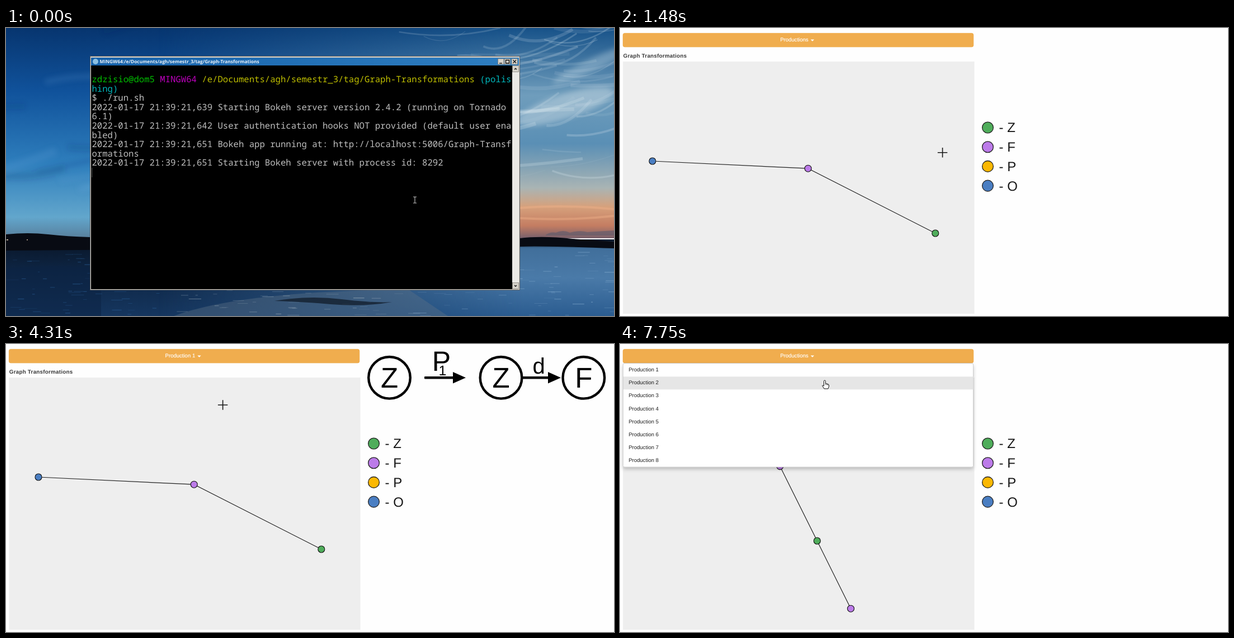
Recreate the animation shown at these times as an HTML page. Size 1087 by 515 pixels, loop 8 s.

```html
<!DOCTYPE html>
<html lang="en">
<head>
<meta charset="utf-8">
<title>Graph Transformations</title>
<style>
html, body { margin: 0; width: 100%; height: 100%; overflow: hidden; background: #fefefe; }
svg { display: block; text-rendering: geometricPrecision; }
text { white-space: pre; font-family: "Liberation Sans", Arial, sans-serif; }
.term text { font: 15.63px "Noto Sans Mono", "DejaVu Sans Mono", monospace; fill: #bfbfbf; }
.ui { font-size: 9.55px; }
</style>
</head>
<body>
<svg id="stage" width="1087" height="515" viewBox="0 0 1087 515" xmlns="http://www.w3.org/2000/svg"></svg>
<script>
const LOOP = 8000;
const COLORS = { Z: '#4fad5b', F: '#bc7be9', P: '#fbb803', O: '#4a7ec2' };

const rect = (x, y, w, h, fill, more = '') =>
  `<rect x="${x}" y="${y}" width="${w}" height="${h}" fill="${fill}" ${more}/>`;
const text = (x, y, s, more = '') => `<text x="${x}" y="${y}" ${more}>${s}</text>`;
const path = (d, more) => `<path d="${d}" ${more}/>`;
const group = (id, body, more = '') => `<g id="${id}" ${more}>${body}</g>`;

let seed = 11;
const rnd = (a, b) => {
  seed = (seed * 16807) % 2147483647;
  return a + (b - a) * seed / 2147483647;
};
const many = (n, make) => Array.from({ length: n }, (_, i) => make(i)).join('');

function gradient(id, stops, dir = 'x2="0" y2="1"') {
  return `<linearGradient id="${id}" x1="0" y1="0" ${dir}>` +
    stops.map(([at, c, o = 1]) => `<stop offset="${at}" stop-color="${c}" stop-opacity="${o}"/>`).join('') +
    '</linearGradient>';
}

function defs() {
  return '<defs>' +
    gradient('skyL', [[0, '#07356f'], [.3, '#10529b'], [.65, '#2f7fbd'], [.9, '#62a6cc'], [1, '#587f9c']]) +
    gradient('skyR', [[0, '#175289'], [.32, '#6f9dbc'], [.55, '#5a8fb5'], [.76, '#a9b4b4'],
      [.85, '#d6a17c'], [.94, '#c47d62'], [1, '#77606c']]) +
    gradient('waterL', [[0, '#091526'], [.35, '#0d2340'], [1, '#15365f']]) +
    gradient('waterR', [[0, '#0c1727'], [.12, '#416f9b'], [.5, '#4a7aa8'], [1, '#2b5c90']]) +
    gradient('side', [[.25, '#fff', 0], [.85, '#fff', 1]], 'x2="1" y2="0"') +
    gradient('title', [[0, '#1662ab'], [1, '#2f7ec0']], 'x2="1" y2="0"') +
    `<mask id="right">${rect(0, 0, 1087, 515, 'url(#side)')}</mask>` +
    '<filter id="soft"><feGaussianBlur stdDeviation="5"/></filter>' +
    '<filter id="shade" x="-5%" y="-10%" width="110%" height="125%">' +
    '<feDropShadow dx="0" dy="3.5" stdDeviation="3" flood-opacity=".22"/></filter></defs>';
}

function wallpaper() {
  const streak = () => {
    const x = rnd(700, 1050), y = rnd(-20, 260), w = rnd(60, 190);
    return path(`M${x} ${y}q${w / 2} ${rnd(-5, 25)} ${w} ${rnd(-50, 10)}`,
      `fill="none" stroke="#dfeaf0" stroke-width="${rnd(1, 7)}" opacity="${rnd(.06, .24)}"`);
  };
  const wisp = () => {
    const x = rnd(-60, 480), y = rnd(5, 330);
    return path(`M${x} ${y}q60 ${rnd(-22, 8)} ${rnd(90, 170)} ${rnd(-40, -5)}`,
      `fill="none" stroke="${rnd(0, 1) < .5 ? '#052b5e' : '#6fb0dc'}" stroke-width="${rnd(3, 15)}" opacity=".16"`);
  };
  const ripple = () => {
    const x = rnd(0, 1087), y = rnd(400, 515), mid = x > 300 && x < 720;
    const c = mid ? '#9aacb9' : x > 720 ? '#86add0' : '#2b619a';
    return path(`M${x} ${y}h${rnd(3, 24)}`, `stroke="${c}" stroke-width="${rnd(.5, 1.5)}" opacity="${rnd(.2, .55)}"`);
  };
  return rect(0, 0, 1087, 376, 'url(#skyL)') +
    `<g mask="url(#right)">${rect(0, 0, 1087, 376, 'url(#skyR)')}</g>` +
    `<g filter="url(#soft)">${many(28, wisp)}` +
    '<ellipse cx="1000" cy="140" rx="90" ry="22" fill="#dce7ea" opacity=".4" transform="rotate(-18 1000 140)"/>' +
    '<ellipse cx="1050" cy="65" rx="80" ry="11" fill="#b7d0df" opacity=".4" transform="rotate(-25 1050 65)"/></g>' +
    many(55, streak) +
    path('M918 322q80 -7 169 2M918 340q90 5 169 -4', 'fill="none" stroke="#efb28b" stroke-width="4" opacity=".4"') +
    path('M965 370q8 -6 18 -4q13 -6 25 0q18 -5 31 -1l48 -3v9h-122z', 'fill="#665d6c" opacity=".7"') +
    rect(0, 378, 1087, 137, 'url(#waterL)') +
    `<g mask="url(#right)">${rect(0, 378, 1087, 137, 'url(#waterR)')}</g>` +
    path('M0 369q40 -4 75 0t75 5L918 376q40 -5 95 1l74 5V394Q950 389 918 391L0 398Z', 'fill="#080b13"') +
    path('M0 430Q90 422 170 430V515H0Z', 'fill="#0b2344" opacity=".55"') +
    path('M300 515Q420 470 720 468L790 515Z', 'fill="#5c7185" opacity=".4"') +
    many(260, ripple) +
    path('M480 488q60 -10 120 -3t90 5q-50 9 -110 4t-100 -6z', 'fill="#101b29" opacity=".75"') +
    rect(1, 378, 3, 1.5, '#f4d9b8') + rect(37, 378, 2, 1.5, '#cdb79c');
}

function terminal() {
  const row = (i, s) => text(153.4, 97.2 + i * 16.57, s);
  const tint = (c, s) => `<tspan fill="${c}">${s}</tspan>`;
  const at = s => '2022-01-17 21:39:21,' + s;
  const dir = '/e/Documents/agh/semestr_3/tag/Graph-Transformations';
  const lines = [
    `${tint('#00be00', 'zdzisio@dom5')} ${tint('#be00be', 'MINGW64')} ${tint('#bebe00', dir)} ${tint('#00b9be', '(polis')}`,
    tint('#00b9be', 'hing)'),
    '$ ./run.sh',
    at('639 Starting Bokeh server version 2.4.2 (running on Tornado'),
    '6.1)',
    at('642 User authentication hooks NOT provided (default user ena'),
    'bled)',
    at('651 Bokeh app running at: http://localhost:5006/Graph-Transf'),
    'ormations',
    at('651 Starting Bokeh server with process id: 8292')
  ];
  const key = (x, y, w, h, d) => rect(x, y, w, h, '#d6d2ca', 'stroke="#77736c" stroke-width=".7"') +
    path(d, 'fill="none" stroke="#111" stroke-width="1.3"');
  return rect(150.5, 50.5, 768, 418, '#d4d0c8', 'stroke="#5d5f62"') +
    rect(152, 53, 765, 14, 'url(#title)') +
    '<circle cx="160" cy="60" r="5" fill="#8cc0e2"/>' +
    text(167.5, 63.2, 'MINGW64:' + dir, 'font-weight="700" fill="#e9f1f8" style="font-family:\'Open Sans\',\'Noto Sans\',sans-serif;font-size:8.4px"') +
    key(879.5, 55, 10.5, 10, 'M882 63h5') +
    key(891, 55, 10.5, 10, 'M893.5 57.5h6v5.5h-6z') +
    key(904, 55, 10.5, 10, 'M906.5 57.2l5.5 5.5m0 -5.5l-5.5 5.5') +
    rect(152, 67, 753, 400, '#000') + rect(905, 67, 12, 400, '#ebe9e5') +
    key(905.5, 67.5, 11, 11, 'M909 74.2l2 -2l2 2') +
    key(905.5, 455.5, 11, 11, 'M909 460l2 2l2 -2') +
    `<g class="term">${lines.map((s, i) => row(i, s)).join('')}</g>` +
    rect(153.4, 250, 1, 17, '#4c4c4c');
}

const node = ([kind, x, y]) =>
  `<circle class="node" cx="${x}" cy="${y}" r="6" fill="${COLORS[kind]}" stroke="#111" stroke-width="1.1"/>`;
const graph = (id, nodes) => group(id,
  path('M' + nodes.map(n => n[1] + ' ' + n[2]).join('L'), 'fill="none" stroke="#222" stroke-width="1.2"') +
  nodes.map(node).join(''));

function legend() {
  return Object.entries(COLORS).map(([k, c], i) => {
    const y = 178 + i * 34.7;
    return `<circle cx="657.5" cy="${y}" r="9.9" fill="${c}" stroke="#222" stroke-width="1.3"/>` +
      text(677.5, y + 8.4, '- ' + k, 'font-size="24" fill="#151515"');
  }).join('');
}

function rule() {
  const mid = (x, y, size, s) => text(x, y, s, `font-size="${size}" text-anchor="middle"`);
  const ring = (x, s) => `<circle cx="${x}" cy="60.3" r="37.3" fill="none" stroke="#000" stroke-width="4.4"/>` + mid(x, 78, 51, s);
  const arrow = (x, end) => rect(x, 58, end - x - 20, 4.4, '#000', 'rx="1"') +
    path(`M${end - 23} 50L${end} 60.2L${end - 23} 70.4Z`, '');
  return ring(685.5, 'Z') + mid(778.5, 47.5, 50, 'P') + mid(780.5, 55.5, 25, '1') + arrow(748, 822) +
    ring(885, 'Z') + arrow(923, 992) + mid(952.5, 53, 40, 'd') + ring(1032.8, 'F');
}

function menu() {
  return rect(5.5, 34.5, 626, 185.5, '#fff', 'rx="2.5" stroke="#c4c4c4" stroke-width=".8" filter="url(#shade)"') +
    rect(6, 0, 625.5, 23, '#e6e6e6', 'id="row"') +
    many(8, i => text(15.4, 49.2 + i * 23.14, 'Production ' + (i + 1), 'class="ui" fill="#1c1c1c"'));
}

const outline = 'fill="#fff" stroke="#111" stroke-linejoin="round"';
const cursors = {
  beam: path('M-3 -5.5H-.8L0 -5L.8 -5.5H3M0 -5V5M-3 5.5H-.8L0 5L.8 5.5H3', 'fill="none" stroke="#c8c8c8" stroke-width="1.1"'),
  arrow: path('M0 0V13L3 10.3L5.2 15.5L7.2 14.7L5 9.7H9Z', outline + ' stroke-width=".9"'),
  hand: path('M-1.5 1.5Q-1.5 0 0 0T1.5 1.5V5.5L6 6.8Q7.5 7.3 7.5 9V11L6 15H-1L-4.5 9.5Q-4 8 -1.5 10Z', outline) +
    path('M1.5 5.5V8M3.6 6.2V8.5M5.6 6.8V9', 'stroke="#111" stroke-width=".7"'),
  cross: path('M-8.7 0H8.7M0 -8.7V8.7', 'stroke="#161616" stroke-width="1.6"')
};

const stage = document.getElementById('stage');
stage.innerHTML = defs() +
  group('desktop', wallpaper() + terminal()) +
  group('blank', rect(0, 0, 1087, 515, '#fefefe')) +
  group('page',
    rect(5.4, 9.4, 626.4, 24.4, '#f0ad4e', 'rx="3" stroke="#eea236" stroke-width=".8" id="button"') +
    text(286.4, 24, '', 'class="ui" id="label" fill="#fff" stroke="#fff" stroke-width=".15"') +
    path('M0 20.5h6.4l-3.2 3.3z', 'fill="#fff" id="caret"') +
    text(5.8, 53.4, 'Graph Transformations', 'font-size="9.8" font-weight="700" letter-spacing=".25" fill="#3a3a3a"') +
    rect(5.3, 60, 628.3, 451, '#eee') +
    graph('before', [['O', 58, 238], ['F', 336.2, 251.2], ['Z', 563.8, 367]]) +
    graph('after', [['O', 226.3, 97.6], ['F', 286, 218.6], ['Z', 352.4, 352], ['F', 412.6, 473.2]]) +
    legend() + group('rule', rule()) + group('menu', menu())) +
  group('cursor', Object.entries(cursors).map(([k, d]) => group(k, d)).join(''));

const $ = id => document.getElementById(id);
const show = (id, on) => $(id).setAttribute('display', on ? 'inline' : 'none');

// Pointer moves: first step, last step, step count, end point.
const start = [731, 307.5];
const moves = [
  [120, 120, 1, 729.3, 306.5],
  [370, 1070, 6, 576.5, 223],
  [1480, 1480, 1, 576.6, 222.8],
  [1790, 2630, 7, 388, 24],
  [2770, 2770, 1, 386.8, 33],
  [2900, 3180, 3, 359.5, 50.5],
  [4310, 4310, 1, 387.6, 109],
  [4440, 5180, 6, 577, 388],
  [5330, 5330, 1, 565, 372],
  [5740, 5740, 1, 566, 372],
  [6460, 6600, 2, 526.2, 318.8],
  [6760, 7340, 5, 374, 24],
  [7470, 7470, 1, 372, 28],
  [7610, 7610, 1, 369, 48],
  [7750, 7750, 1, 366, 65]
];
const ease = p => p * p * (3 - 2 * p) * .5 + p * .5;

function pointer(t) {
  let [x, y] = start;
  for (const [t0, t1, n, ex, ey] of moves) {
    if (t < t0) break;
    const gap = (t1 - t0) / (n - 1 || 1) || 1;
    const p = ease(Math.min(n, Math.floor((t - t0) / gap + 1e-6) + 1) / n);
    x += (ex - x) * p;
    y += (ey - y) * p;
  }
  return [x, y];
}

function draw(t) {
  const [x, y] = pointer(t);
  const within = (a, b) => t >= a && t < b;
  const loaded = t >= 1480;
  const open = within(2630, 3320) || t >= 7470;
  const chosen = within(3600, 6320);

  show('desktop', t < 120);
  show('blank', t >= 120);
  show('page', loaded);
  show('before', t < 6320);
  show('after', t >= 6320);
  show('rule', within(3730, 6320));
  show('menu', open);

  $('button').setAttribute('fill', y < 34 ? '#eda33b' : '#f0ad4e');
  $('label').textContent = chosen ? 'Production 1' : 'Productions';
  $('label').setAttribute('x', chosen ? 284.6 : 286.4);
  $('caret').setAttribute('transform', `translate(${chosen ? 342.3 : 340.8} 0)`);

  const row = Math.floor((y - 35) / 23.14);
  show('row', open && row >= 0 && row < 8);
  $('row').setAttribute('y', 35.2 + row * 23.14);

  // Picking the last node dims the other two.
  document.querySelectorAll('#before .node').forEach((n, i) =>
    n.setAttribute('opacity', t >= 6020 && i < 2 ? .2 : 1));

  const kind = t < 120 ? 'beam' : !loaded ? 'arrow' : open || y < 34 ? 'hand' : y > 60 ? 'cross' : 'arrow';
  Object.keys(cursors).forEach(k => show(k, k === kind));
  $('cursor').setAttribute('transform', `translate(${x.toFixed(1)} ${y.toFixed(1)})`);
}

const begin = performance.now();
function tick() {
  draw((performance.now() - begin) % LOOP);
  requestAnimationFrame(tick);
}
draw(0);
requestAnimationFrame(tick);
</script>
</body>
</html>
```
